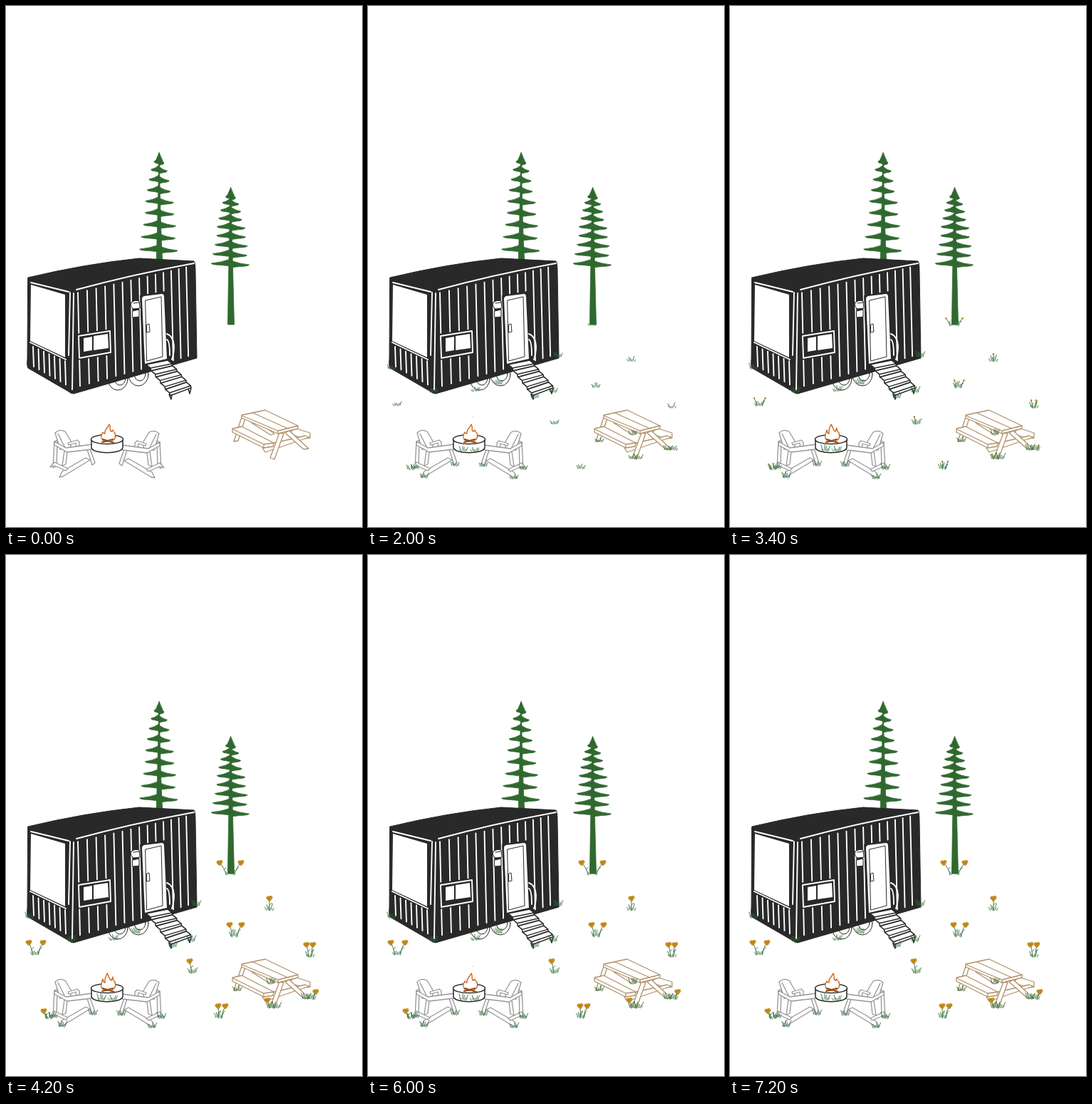
These frames come from a looping animation (500x731 px, 7.4 s). An HTML page:

```html
<!DOCTYPE html>
<html lang="en">
<head>
<meta charset="utf-8">
<title>Campsite</title>
<style>
  html, body { margin: 0; height: 100%; overflow: hidden; background: #fff; }
  svg { display: block; width: 500px; height: 731px; }
  path, ellipse { stroke-linejoin: round; stroke-linecap: round; }
  .ink { fill: #fff; stroke: #292929; stroke-width: 1.5; }
  .thin { fill: #fff; stroke: #292929; stroke-width: 1; }
  .gap { fill: none; stroke: #fff; stroke-width: 1.9; }
  .chair { fill: #fff; stroke: #999699; stroke-width: 1.3; }
  .wood { fill: #fff; stroke: #b0916a; stroke-width: 1.3; }
  .tree { fill: #30692f; stroke: #30692f; stroke-width: .8; }
  .green { fill: none; stroke: #326b38; stroke-width: .9; }
  .line { fill: none; }
</style>
</head>
<body>
<svg viewBox="0 0 500 731">
  <g id="trees" class="tree"></g>

  <g class="thin">
    <ellipse cx="157" cy="523" rx="14" ry="16"/>
    <ellipse cx="160" cy="522" rx="8" ry="10"/>
    <ellipse cx="186" cy="517" rx="14" ry="16"/>
    <ellipse cx="188" cy="516" rx="8" ry="10"/>
  </g>

  <path d="M31 381Q110 362 187 354L264 358Q266 360 266 372L268 494L95 544Q91 544 88 541L31 508Q29 505 30 495Z" fill="#292929" stroke="#292929"/>
  <path id="siding" class="gap"/>
  <path class="gap" d="M99 398Q180 376 264 361M35 388L88 401M90 402L88 490M34 472L84 496M95 403L93 538"/>
  <path d="M35 391L83 405L83 493L34 470Z" fill="#fff"/>
  <path d="M99 460L148 453L149 489L100 497Z" fill="#292929"/>
  <path class="gap" d="M102 463L146 456L147 486L103 494Z"/>
  <path d="M109 466L121 464L121 483L109 485ZM123 463L143 460L144 480L123 483Z" fill="#fff"/>

  <path d="M188 406L224 400L229 498L193 506Z" fill="#292929"/>
  <path d="M191 411Q191 408 194 407L219 404Q222 404 222 408L226 495L195 502Z" fill="#fff"/>
  <path class="thin" d="M196 413L218 408L220 492L198 498ZM198 447L201 446L202 457L198 458Z"/>
  <path class="thin" d="M176 416Q181 412 187 414L188 424L179 425Q174 422 176 416ZM179 417L187 416M178 428L187 426L187 436L178 437Z"/>
  <path class="gap" d="M226 460Q235 463 236 477Q236 488 233 496M226 468Q230 470 230 490"/>
  <path id="stairs" class="ink"/>

  <g id="chair" class="chair">
    <path d="M68 611L72 609L71 646L66 648ZM82 624L86 625L84 643L79 645Z"/>
    <path d="M75 661L79 653L112 634L118 637L80 660Z"/>
    <path d="M62 647L68 640L87 649L84 652L68 645Z"/>
    <path d="M69 599Q75 593 83 597L92 612L90 621L76 622Z"/>
    <path class="line" d="M73 600L83 620"/>
    <path d="M87 613L100 609L103 612L103 619L99 620L98 613L88 616Z"/>
    <path d="M114 622L118 621L125 641L121 644Z"/>
    <path d="M68 611L84 620L121 615L123 619L120 622L86 626L68 616Z"/>
  </g>
  <use href="#chair" transform="matrix(-1 0 0 1 284 1)"/>

  <path class="ink" d="M120 607V620C123 629 161 629 164 620V607"/>
  <ellipse class="ink" cx="142" cy="608" rx="22.5" ry="6.5"/>
  <path id="flame" fill="#fff" stroke="#ce6519" stroke-width="1.4"/>
  <path class="line" d="M135 612L150 608M136 608L152 613" stroke="#8d4a1c" stroke-width="2"/>
  <path id="spark" d="M147 577h.5" stroke="#aaa"/>

  <g class="wood">
    <path d="M331 577L336 578L326 610L320 611ZM345 585L372 602L377 600L356 586Z"/>
    <path d="M405 592L427 599L427 606L418 607L398 600Z"/>
    <path d="M360 620L364 616L420 603L426 605L364 626Z"/>
    <path d="M318 593L331 590L376 613L375 618L362 620L318 598Z"/>
    <path class="line" d="M319 594L362 615L376 613M362 615V620"/>
    <path d="M384 599L390 600L377 636L371 634ZM392 599L398 596L425 621L418 622Z"/>
    <path d="M331 574L364 567L410 589L410 593L382 600L331 578Z"/>
    <path class="line" d="M332 575L382 596L410 589M347 571L396 593M382 596V600"/>
  </g>

  <path id="grass" class="green"/>
  <path id="stems" class="green"/>
  <path id="blooms" fill="#cb911c" stroke="#b37c18" stroke-width=".6"/>
</svg>

<script>
const $ = id => document.getElementById(id);
const set = (id, d) => $(id).setAttribute("d", d);
const clamp = v => Math.max(0, Math.min(1, v));
const noise = n => { const v = Math.sin(n * 127.1) * 43758.5; return v - Math.floor(v); };

// Boughs widen and spread apart toward the lowest tier.
function tree(x, top, lowest, base) {
  let shapes = `<path d="M${x} ${top}L${x - 6} ${top + 14}L${x + 6} ${top + 14}Z"/>` +
    `<path d="M${x} ${top}Q${x - 3} ${lowest} ${x - 4} ${base}H${x + 5}Q${x + 3} ${lowest} ${x} ${top}Z"/>`;
  for (let i = 0; i < 9; i++) for (const side of [-1, 1]) {
    const u = i / 8, y = top + 14 + (lowest - top - 14) * u ** 1.15 + side;
    const reach = 7 + 19 * u ** .7 + (noise(i + side * 20) - .4) * 6 * u;
    const tip = x + side * reach, mid = x + side * reach / 2;
    shapes += `<path d="M${x} ${y - 7}Q${mid} ${y - 2} ${tip} ${y - 1}Q${tip} ${y + 1} ${mid} ${y + 1.5}L${x} ${y + 3}Z"/>`;
  }
  $("trees").innerHTML += shapes;
}
tree(215, 206, 343, 358);
tree(315.5, 255, 363, 447);

let siding = "";
for (let i = 0; i < 14; i++) {
  const k = 3 + 13 * i - .1 * i * i;
  siding += `M${98 + k} ${403 - k * .235}L${101 + k} ${534 - k * .275}`;
}
for (let k = 0; k < 48; k += 7.5) siding += `M${38 + k} ${478 + k * .45}l1 ${28 + k * .11}`;
set("siding", siding);

let stairs = "";
for (let i = 0; i < 5; i++) {
  const lx = 203 + 6.7 * i, ly = 508 + 8.7 * i, rx = 233 + 6.6 * i, ry = 502 + 7.7 * i;
  stairs += `M${lx - 6} ${ly - 5}L${rx - 6} ${ry - 5}L${rx} ${ry}L${lx} ${ly}ZM${lx} ${ly}l.7 4L${rx + .6} ${ry + 3}L${rx} ${ry}`;
}
set("stairs", stairs + "M229 545l3 7l1 -7M256 537l2 7l2 -8");

// Clumps in the open: root x, root y, then the sideways lean of each flower.
const clumps = [
  [315, 449, -15, 15], [370, 499, 0], [320, 536, -6, 11], [41, 561, -9, 11], [262, 587, -4],
  [427, 564, -5, 4], [299, 650, -1, 9], [60, 651, -7], [372, 636, -5], [429, 624, 6]];
const chairFeet = [[66, 650], [79, 663], [122, 646]];
const tufts = [
  ...clumps, ...chairFeet, ...chairFeet.map(([x, y]) => [284 - x, y + 1]),
  [33, 510], [92, 543], [151, 541], [183, 532], [234, 551], [260, 543], [267, 493],
  [134, 625], [150, 625], [325, 612], [372, 602], [380, 636], [421, 624]];

function grass(grow) {
  let d = "";
  if (grow) tufts.forEach(([x, y], i) => {
    for (let j = 0; j < 6; j++) {
      const u = j / 5 - .5, r = noise(i * 31 + j + 1);
      const height = (3 + r * 5) * grow, lean = (u * 4 + r - .5) * grow;
      d += `M${x + u * 9} ${y - r * 2}q0 ${-height * .6} ${lean} ${-height}`;
    }
  });
  return d;
}

function flame(pose) {
  const even = pose % 2 ? 0 : 1, tip = 142 + 3 * even;
  return `M138 611C131 606 134 601 136 ${595 + 3 * even}Q137 600 139 600C138 593 ${tip - 2} 593 ${tip} 587` +
    `C${tip + 3} 591 144 595 148 597L150 ${592 + 3 * even}Q150 597 153 599C155 605 153 609 147 611Z`;
}

const circle = (x, y, r) => `M${x - r} ${y}a${r} ${r} 0 1 0 ${2 * r} 0a${r} ${r} 0 1 0 ${-2 * r} 0`;

function flowers(rise, open) {
  let stems = "", blooms = "";
  if (rise) clumps.forEach(([x, y, ...leans], i) => leans.forEach(lean => {
    const edge = x + lean * .4, dx = lean * .6 * rise;
    const dy = -(i < 7 ? 17 : 11) * rise, hx = edge + dx, hy = y + dy;
    stems += `M${edge} ${y}q${dx * .2} ${dy * .6} ${dx} ${dy}M${edge + dx * .3} ${y + dy * .45}l${3 * rise} ${-3 * rise}`;
    const r = 2.3 * open;
    if (open) blooms += circle(hx - r * .8, hy - r * .4, r) + circle(hx + r * .8, hy - r * .6, r) + circle(hx, hy + r * .5, r);
  }));
  set("stems", stems);
  set("blooms", blooms);
}

function draw(step) {
  const t = step * 200, pose = step % 4;
  set("grass", grass(clamp((t - 1000) / 1400)));
  flowers(clamp((t - 2400) / 1600), clamp((t - 3200) / 800));
  set("flame", flame(pose));
  $("spark").style.display = pose === 2 ? "" : "none";
}

let shown = -1;
function tick() {
  const step = Math.floor(performance.now() % 7400 / 200);
  if (step !== shown) draw(step);
  shown = step;
  requestAnimationFrame(tick);
}
tick();
</script>
</body>
</html>
```
